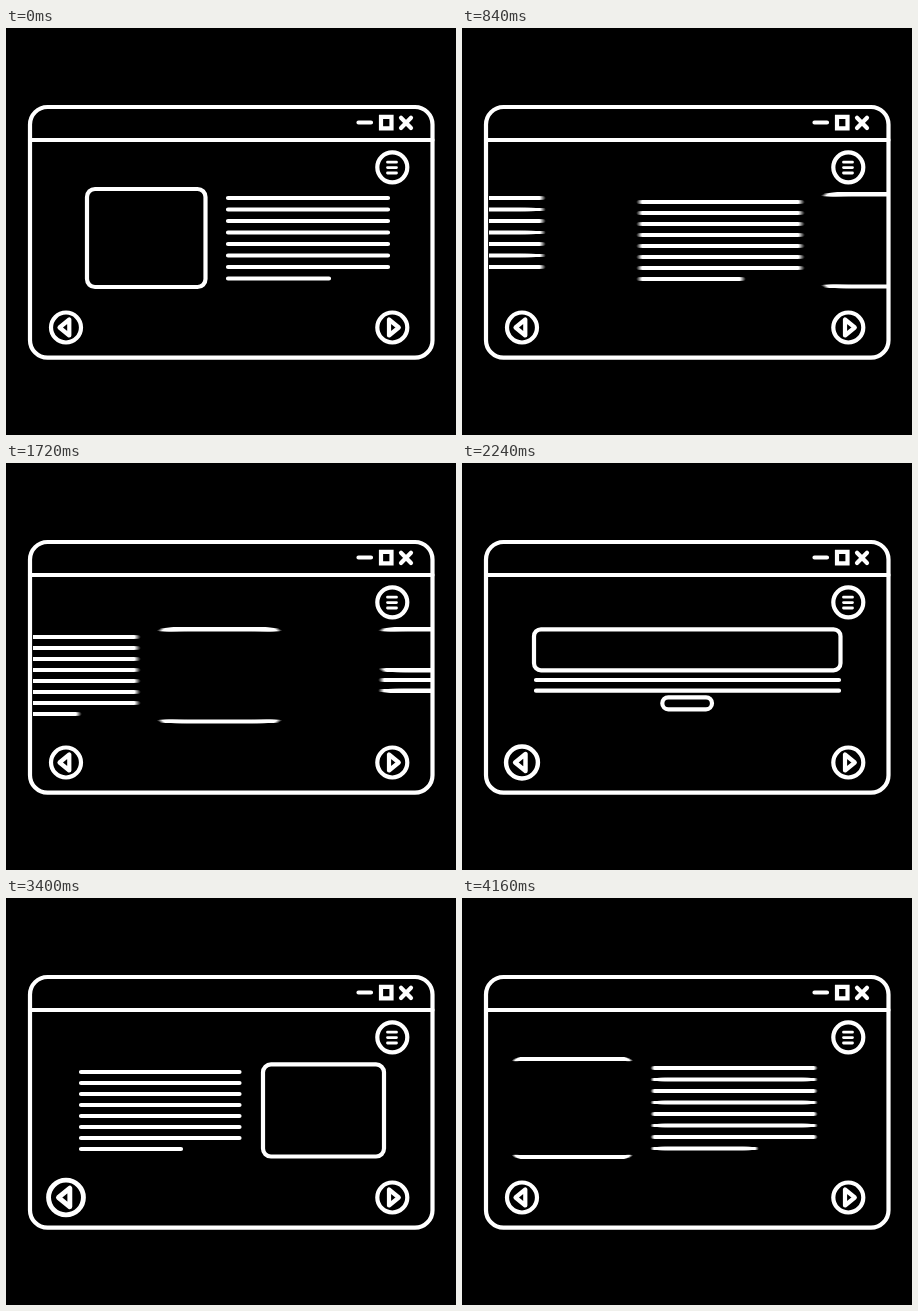
Recreate the animation shown at these times as an HTML page. Size 450 by 407 pixels, loop 4200 ms.

```html
<!DOCTYPE html>
<html lang="en">
<head>
<meta charset="utf-8">
<title>Page slider</title>
<style>
  html, body { margin: 0; width: 100%; height: 100%; overflow: hidden; background: #000; }
  svg { display: block; width: 450px; height: 407px; }
  .ink { fill: none; stroke: #fff; stroke-width: 4.2; stroke-linecap: round; stroke-linejoin: round; }
</style>
</head>
<body>
<svg viewBox="0 0 450 407">
  <defs>
    <clipPath id="view"><rect x="27" y="115" width="397.5" height="212"/></clipPath>
    <filter id="smear" filterUnits="userSpaceOnUse" x="-60" y="100" width="570" height="240" color-interpolation-filters="sRGB">
      <feGaussianBlur id="blur" stdDeviation="0 0"/>
      <feComponentTransfer><feFuncA type="linear" slope="4" intercept="-1.5"/></feComponentTransfer>
    </filter>
  </defs>

  <g class="ink">
    <g clip-path="url(#view)">
      <g id="lens">
        <g id="track">
          <g>
            <rect x="81" y="161" width="118.5" height="98" rx="8"/>
            <path id="textA"/>
          </g>
          <g transform="translate(407)">
            <path id="textB"/>
            <rect x="257" y="166.3" width="121" height="92.2" rx="8"/>
          </g>
          <g transform="translate(814)">
            <rect x="72" y="166.3" width="306.5" height="41" rx="7"/>
            <path d="M74 217H377M74 227.7H377"/>
            <rect x="200.3" y="234.3" width="49.7" height="12" rx="6"/>
          </g>
        </g>
      </g>
    </g>

    <rect x="24" y="79" width="402.5" height="250.7" rx="17.5"/>
    <path d="M24 112H426.5M352.5 94.5H365"/>
    <path d="M375 88.8H385.5V100.3H375ZM395 89.7L405 100M405 89.7L395 100" stroke-linejoin="miter"/>

    <circle cx="386.3" cy="139.3" r="15"/>
    <path d="M381.5 134.2H390.5M381.5 139.6H390.5M381.5 145H390.5" stroke-width="2.8"/>

    <g id="prev">
      <circle cx="60" cy="299.5" r="15"/>
      <path d="M53.5 299.5L63.3 291.5V307.5Z"/>
    </g>
    <g id="next">
      <circle cx="386.3" cy="299.5" r="15"/>
      <path d="M392.8 299.5L383 291.5V307.5Z"/>
    </g>
  </g>
</svg>

<script>
const LOOP = 4200, STEP = 40, PITCH = 407;
const $ = id => document.getElementById(id);

// press: button pulse start; the slide eases over `dur` but is cut off at `end`
const legs = [
  { press: 0,    start: 320,  dur: 800, end: 1120, from: 0, to: 1 },
  { press: 1120, start: 1440, dur: 800, end: 2240, from: 1, to: 2 },
  { press: 2200, start: 2478, dur: 742, end: 3120, from: 2, to: 1 },
  { press: 3280, start: 3559, dur: 742, end: 4200, from: 1, to: 0 }
];

function paragraph(x, y, pitch, width, shortWidth) {
  let d = '';
  for (let i = 0; i < 8; i++) {
    d += `M${x} ${y + i * pitch}h${i < 7 ? width : shortWidth}`;
  }
  return d;
}

// cubic-bezier(.42, 0, .58, 1)
function ease(x) {
  let lo = 0, hi = 1;
  for (let i = 0; i < 24; i++) {
    const s = (lo + hi) / 2, r = 1 - s;
    if (1.26 * s * r * r + 1.74 * s * s * r + s * s * s < x) lo = s; else hi = s;
  }
  return lo * lo * (3 - 2 * lo);
}

function offset(t) {
  let page = 0;
  for (const leg of legs) {
    if (t < leg.start) break;
    const p = t >= leg.end ? 1 : ease((t - leg.start) / leg.dur);
    page = leg.from + (leg.to - leg.from) * p;
  }
  return -page * PITCH;
}

function pulse(t, forward) {
  let scale = 1;
  for (const leg of legs) {
    const p = (t - leg.press) / 400;
    if (p > 0 && p < 1 && (leg.to > leg.from) === forward) scale += 0.2 * Math.sin(Math.PI * p);
  }
  return scale;
}

function scaleAt(id, x, y, k) {
  $(id).setAttribute('transform', `translate(${x} ${y}) scale(${k}) translate(${-x} ${-y})`);
}

function draw(t) {
  const x = offset(t);
  const moving = legs.some(leg => t > leg.start && t < leg.end);
  const speed = moving ? Math.abs(offset(t + 1) - offset(t - 1)) * STEP / 2 : 0;
  const sigma = Math.min(9, speed * 0.35);
  $('track').setAttribute('transform', `translate(${x})`);
  $('blur').setAttribute('stdDeviation', `${sigma} 0`);
  if (sigma > 0.3) $('lens').setAttribute('filter', 'url(#smear)');
  else $('lens').removeAttribute('filter');
  scaleAt('prev', 60, 299.5, pulse(t, false));
  scaleAt('next', 386.3, 299.5, pulse(t, true));
}

$('textA').setAttribute('d', paragraph(222, 170, 11.5, 160, 101));
$('textB').setAttribute('d', paragraph(75, 174, 11, 158.5, 100));

let origin;
function tick(now) {
  origin ??= now;
  draw(Math.floor((now - origin + 8) / STEP) * STEP % LOOP);
  requestAnimationFrame(tick);
}
draw(0);
requestAnimationFrame(tick);
</script>
</body>
</html>
```
